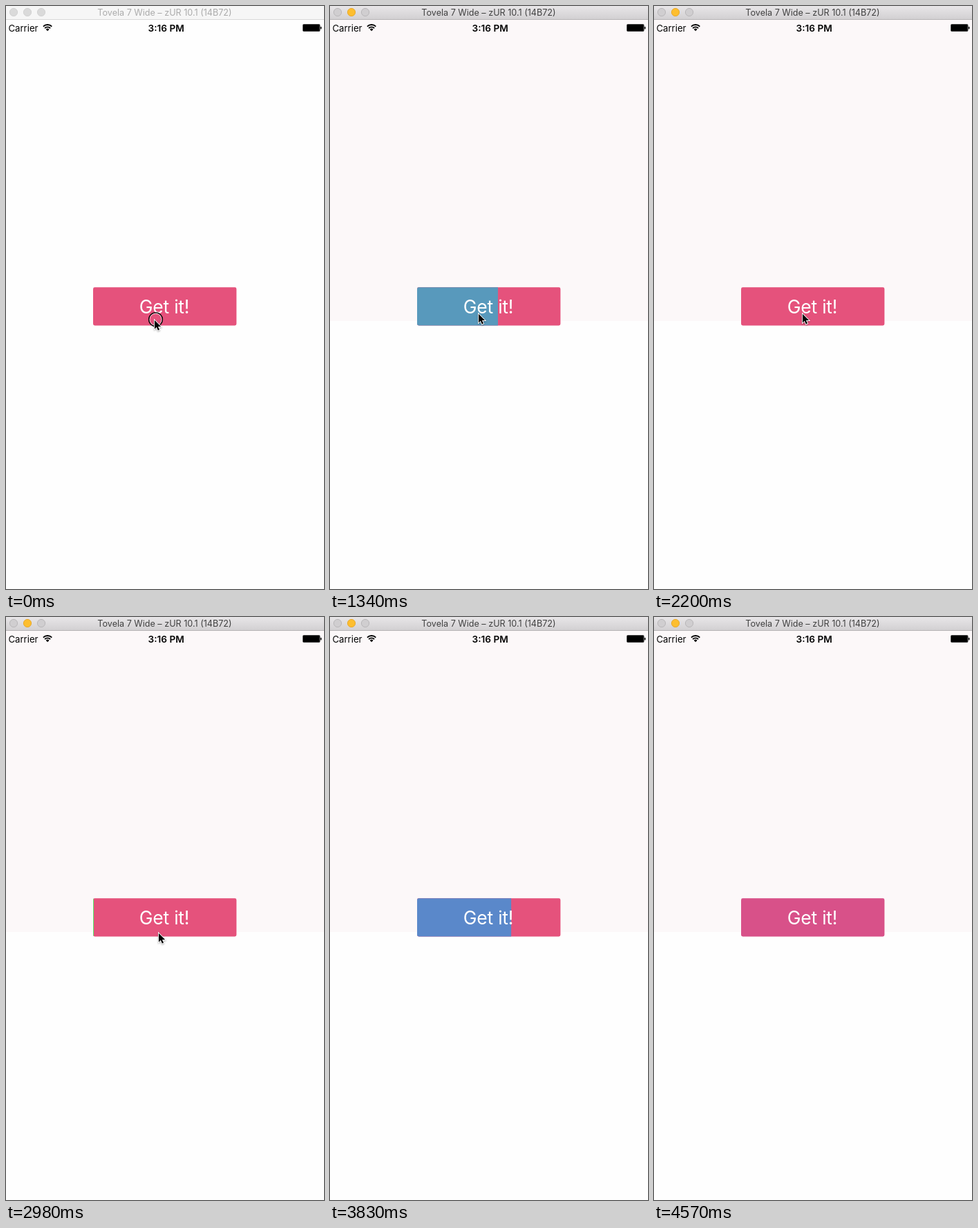
Recreate the animation shown at these times as an HTML page. Size 460x842 px, loop 5660 ms.

```html
<!DOCTYPE html>
<html lang="en">
<head>
<meta charset="utf-8">
<title>Progress button</title>
<style>
  html, body { margin: 0; width: 100%; height: 100%; overflow: hidden; background: #fefefe; }
  svg { display: block; width: 460px; height: 842px; font-family: Inter, "Open Sans", sans-serif; }
</style>
</head>
<body>
<svg viewBox="0 0 460 842">
  <defs>
    <linearGradient id="chrome" x2="0" y2="1">
      <stop stop-color="#e8e6e8"/><stop offset="1" stop-color="#d1cfd1"/>
    </linearGradient>
    <clipPath id="buttonShape"><rect x="126" y="406.3" width="207.4" height="55.2" rx="2.4"/></clipPath>
  </defs>

  <rect width="460" height="842" fill="#fefefe"/>
  <rect id="tint" y="20" width="460" height="435" fill="#fcf8f9"/>

  <!-- title bar -->
  <rect id="bar" width="460" height="20"/>
  <rect id="barLine" y="19" width="460" height="1"/>
  <g id="lights">
    <circle cx="11" cy="9" r="5.6"/><circle cx="31" cy="9" r="5.6"/><circle cx="51" cy="9" r="5.6"/>
  </g>
  <text id="title" x="229.5" y="14" font-size="12.6" text-anchor="middle">Tovela 7 Wide – zUR 10.1 (14B72)</text>

  <!-- status bar -->
  <text x="3.4" y="36.5" font-size="13.2">Carrier</text>
  <g fill="none" stroke="#000" stroke-width="1.9">
    <path d="M53.9 29.6a8.7 8.7 0 0 1 12.4 0M56.1 32.1a5.6 5.6 0 0 1 8 0"/>
    <path d="M60.1 36.2l-2.4-2.5a3.4 3.4 0 0 1 4.8 0z" fill="#000" stroke="none"/>
  </g>
  <text x="231.7" y="36.5" font-size="13.6" font-weight="600" text-anchor="middle">3:16 PM</text>
  <rect x="429.5" y="26.5" width="24.5" height="10" rx="1.2" stroke="#444"/>
  <rect x="454.8" y="29.8" width="1.6" height="3.8" rx=".8"/>

  <!-- button -->
  <g clip-path="url(#buttonShape)">
    <rect x="126" y="406" width="208" height="56" fill="#e5527c"/>
    <rect id="fill" x="126" y="406" height="56"/>
  </g>
  <text x="229" y="444" font-size="26.4" letter-spacing="-.2" fill="#fff" text-anchor="middle">Get it!</text>

  <g id="ring" fill="none">
    <circle cx="216.5" cy="452.8" r="8.8" stroke="#fff"/>
    <circle cx="216.5" cy="452.8" r="9.9" stroke="#000" stroke-width="1.4"/>
  </g>
  <g id="cursor">
    <path d="M.4 1.2v12.8l2.9-2.8 2.1 4.8 2.1-.9-2.1-4.6h4.2z"
          stroke="#fff" stroke-width="1.8" paint-order="stroke"
          style="filter:drop-shadow(0 1px 1px #0005)"/>
  </g>
</svg>

<script>
const LOOP = 5660, STEP = 57;
const FILL_TIME = 1570, FADE_TIME = 130, WIDTH = 207.5;
const PRESSES = [500, 2902];
const GREEN = [72, 255, 102], PURPLE = [100, 74, 255];

const $ = id => document.getElementById(id);
const set = (id, attrs) => {
  for (const name in attrs) $(id).setAttribute(name, attrs[name]);
};
const clamp = v => Math.min(1, Math.max(0, v));
const mix = (a, b, k) => a + (b - a) * k;

// cubic-bezier(.42, 0, .58, 1), solved by bisection
function easeInOut(x) {
  x = clamp(x);
  let low = 0, high = 1;
  for (let i = 0; i < 24; i++) {
    const u = (low + high) / 2;
    if (1.26 * u - 0.78 * u * u + 0.52 * u ** 3 < x) low = u; else high = u;
  }
  return low * low * (3 - 2 * low);
}

// The picture updates in even steps and rests between the two runs.
function sample(t) {
  if (t < 260) return t;
  const [base, end] = t < 2920 ? [260, 2200] : [2920, 4570];
  return base + Math.floor((Math.min(t, end) - base + 5) / STEP) * STEP;
}

function drawWindow(active) {
  set('tint', { visibility: active ? 'visible' : 'hidden' });
  set('bar', { fill: active ? 'url(#chrome)' : '#f6f6f6' });
  set('barLine', { fill: active ? '#b6b4b6' : '#d8d8d8' });
  set('title', { fill: active ? '#404040' : '#ababab' });
  [...$('lights').children].forEach((light, i) => {
    const yellow = active && i === 1;
    light.setAttribute('fill', yellow ? '#fdbe2f' : active ? '#d0ced0' : '#dadada');
    light.setAttribute('stroke', yellow ? '#e8a92c' : active ? '#b9b7b9' : '#d2d2d2');
  });
}

function drawFill(t) {
  const elapsed = t - (t < 2900 ? PRESSES[0] : PRESSES[1]);
  const progress = easeInOut(elapsed / FILL_TIME);
  const color = GREEN.map((c, i) => Math.round(mix(c, PURPLE[i], progress)));
  set('fill', {
    width: WIDTH * progress,
    fill: `rgb(${color})`,
    opacity: 1 - easeInOut((elapsed - FILL_TIME) / FADE_TIME)
  });
}

function drawCursor(t) {
  const rise = clamp((t - 203) / 228);
  const leave = easeInOut((t - 2863) / 770);
  const x = mix(214.5, 344.5, leave);
  const y = t < 50 ? 452.5 : mix(mix(449.5, 443.5, rise), 716.5, leave);
  set('cursor', {
    transform: `translate(${Math.floor(x) + 0.5} ${Math.floor(y) + 0.5})`,
    visibility: t < 3660 ? 'visible' : 'hidden'
  });
  set('ring', { visibility: t < 50 ? 'visible' : 'hidden' });
}

const start = performance.now();

function draw() {
  const t = sample((performance.now() - start) % LOOP);
  drawWindow(t >= 260);
  drawFill(t);
  drawCursor(t);
  requestAnimationFrame(draw);
}

draw();
</script>
</body>
</html>
```
